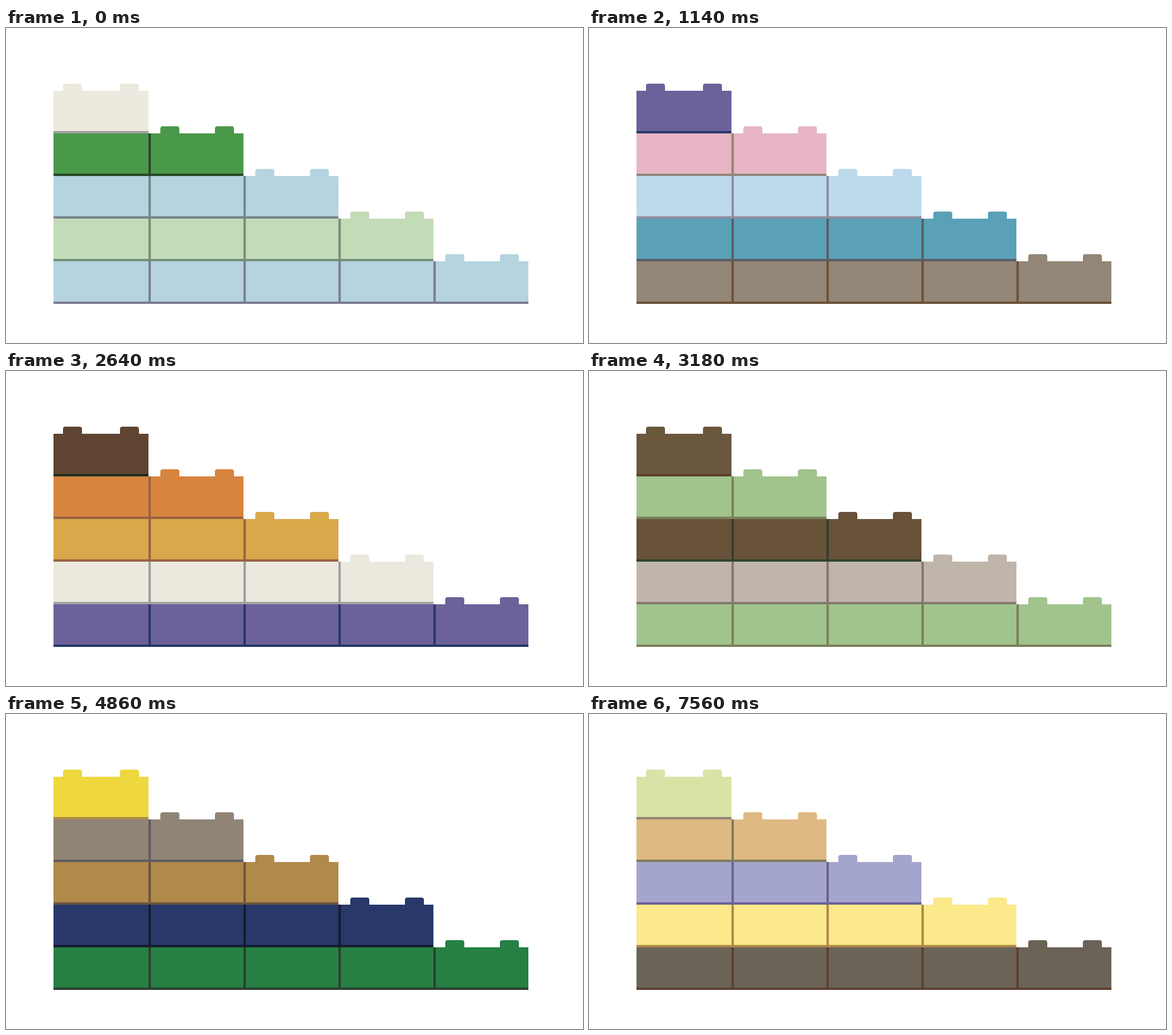
An HTML page with a canvas that plays this animation: 972 px wide and 532 px high, repeating every 7620 ms.

```html
<!DOCTYPE html>
<html lang="en">
<head>
<meta charset="utf-8">
<title>Brick stairs</title>
<style>
  html, body { margin: 0; width: 100%; height: 100%; overflow: hidden; background: #fff; }
  canvas { display: block; }
</style>
</head>
<body>
<canvas id="stage" width="972" height="532"></canvas>
<script>
const ctx = document.getElementById('stage').getContext('2d');

const LOOP = 7620, FIRST = 240, HOLD = 1320;
const LEFT = 80, TOP = 106, W = 160, H = 72, EDGE = 4;

// One scheme per line, rows from top to bottom as face/edge.
const schemes = `
ece9de/a0a0a0 4a984a/2b4a2b b5d4df/78868c c3dbb7/74917c b5d4df/7c8094
6c6199/28386a e7b5c3/92877a bcdaeb/8f8fa3 5aa1b7/5a5d66 928676/6d5239
5f4432/1f2d1f d7843f/9b6243 d8a84a/9b6243 ebe9de/a0a0a0 6c6199/28386a
6b563e/5a3f2a a0c48c/7d805c 68523a/30422c c0b5aa/85786c a0c48c/7d805c
eed83d/b08a4a 908476/5f5d60 b08a4a/6b563e 28386a/151c30 268043/2f3f2f
769380/5f5d60 268043/2f3f2f 6d573e/5c402d 769380/5f5d60 f3d19c/9a8670
d9e3a6/928676 dfb983/7d805c a4a5cd/6c6199 fbe98b/b08a4a 6b6357/5f4030
`.trim().split('\n').map(line =>
  line.split(' ').map(pair => pair.split('/').map(hex => '#' + hex)));

function stud(x, y) {
  ctx.beginPath();
  ctx.roundRect(x, y - 12, 32, 12, [4, 4, 0, 0]);
  ctx.fill();
}

function drawRow(row, [face, edge]) {
  const y = TOP + row * H;
  const last = LEFT + row * W;

  ctx.fillStyle = face;
  ctx.fillRect(LEFT, y, (row + 1) * W, H);
  stud(last + (row ? 20 : 16), y);
  stud(last + 112, y);

  ctx.fillStyle = edge;
  ctx.fillRect(LEFT, y + H - EDGE, (row + 1) * W, EDGE);
  for (let i = 1; i <= row; i++) ctx.fillRect(LEFT + i * W, y, EDGE, H);
}

let shown = -1;

function tick() {
  const t = performance.now() % LOOP;
  const step = t < FIRST ? 0 : 1 + Math.floor((t - FIRST) / HOLD);
  if (step !== shown) {
    shown = step;
    ctx.fillStyle = '#fff';
    ctx.fillRect(0, 0, 972, 532);
    schemes[step].forEach((colors, row) => drawRow(row, colors));
  }
  requestAnimationFrame(tick);
}

tick();
</script>
</body>
</html>
```
